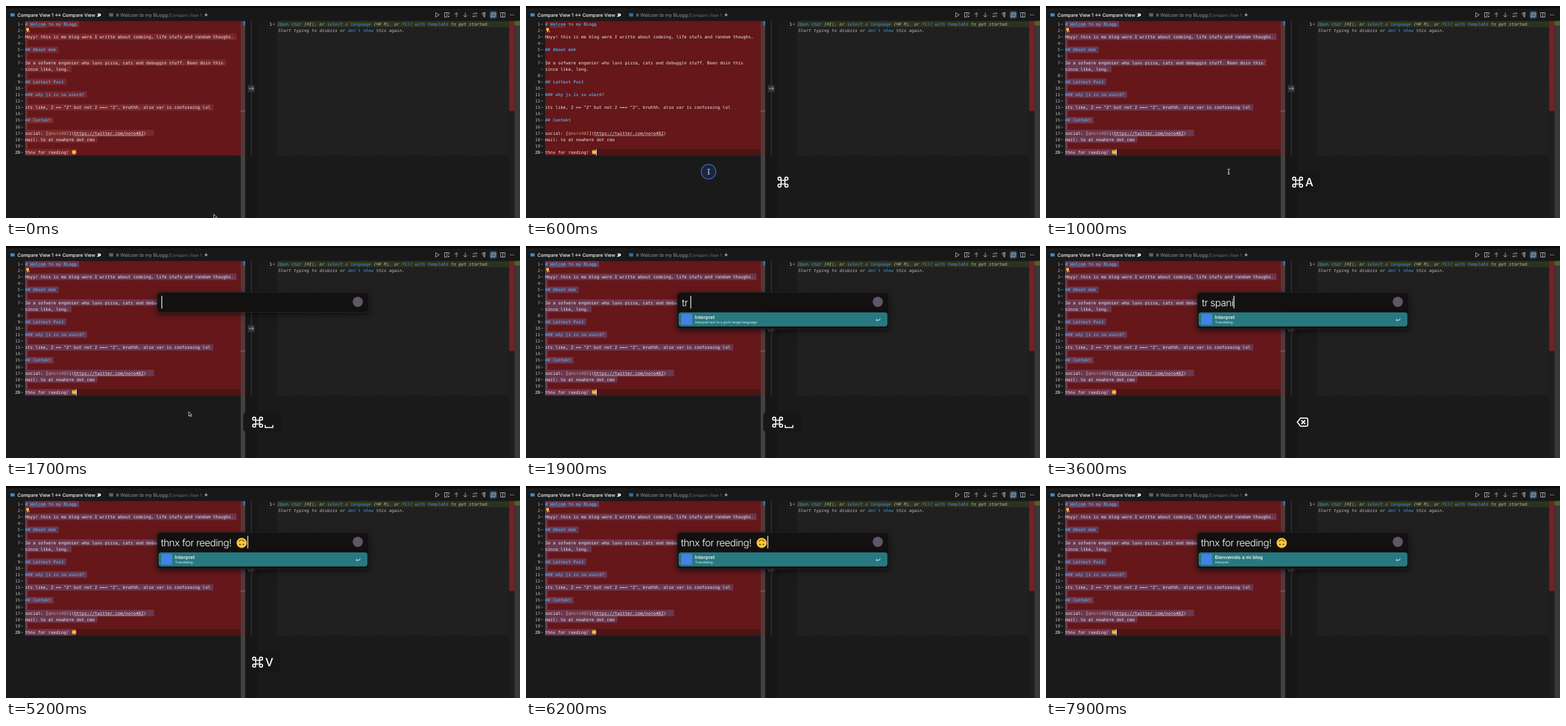
Recreate the animation shown at these times as an HTML page with a canvas. Size 808 by 334 pixels, loop 8000 ms.

```html
<!DOCTYPE html>
<html lang="en">
<head>
<meta charset="utf-8">
<title>Editor and launcher</title>
<style>
html, body { margin: 0; width: 100%; height: 100%; overflow: hidden; background: #1a1a1a; }
canvas { display: block; width: 808px; height: 334px; }
</style>
</head>
<body>
<canvas id="stage"></canvas>
<script>
const W = 808, H = 334, LOOP = 8000;
const ROW = 10.1, TOP = 23.4, CHAR = 4.052;
const MONO = '6.73px "DejaVu Sans Mono", monospace';
const UI = 'Inter, sans-serif';
const HEAD = '#569cd6', LINK = '#3794ff', TEXT = '#ececec';

const canvas = document.getElementById('stage');
const ctx = canvas.getContext('2d');
const ratio = window.devicePixelRatio || 1;
canvas.width = W * ratio;
canvas.height = H * ratio;

// One entry per visual row; a row starting with '~' continues the line above.
const rows = [
  '# Welcom to my BLogg', '',
  'Heyy! this is me blog were I writte about codeing, life stufs and random thoughs.', '',
  '## About meh', '',
  'Im a sofwere engenier who luvs pizza, catz and debuggin stuff. Been doin this',
  '~since like, long.', '',
  '## Lattest Post', '',
  '### why js is so wierd?', '',
  'its like, 2 == "2" but not 2 === "2", bruhhh. also var is confuseing lol', '',
  '## Contakt', '',
  'social: [@noro482](https://twitter.com/noro482)  ',
  'mail: to at nowhere dot cmo', '',
  'thnx for reeding! '
];

const clamp = v => Math.max(0, Math.min(1, v));
const ramp = (t, a, b) => clamp((t - a) / (b - a));
const ease = p => p * p * (3 - 2 * p);

function rect(x, y, w, h, color) {
  ctx.fillStyle = color;
  ctx.fillRect(x, y, w, h);
}

function round(x, y, w, h, r, fill, stroke) {
  ctx.beginPath();
  ctx.roundRect(x, y, w, h, r);
  if (fill) { ctx.fillStyle = fill; ctx.fill(); }
  if (stroke) { ctx.strokeStyle = stroke; ctx.lineWidth = 0.7; ctx.stroke(); }
}

function circle(x, y, r, color) {
  ctx.fillStyle = color;
  ctx.beginPath();
  ctx.arc(x, y, r, 0, Math.PI * 2);
  ctx.fill();
}

function label(text, x, y, font, color, spacing = 0, align = 'left') {
  ctx.font = font;
  ctx.letterSpacing = spacing + 'px';
  ctx.textAlign = align;
  ctx.fillStyle = color;
  ctx.fillText(text, x, y);
}

function stroke(path, color, width) {
  ctx.strokeStyle = color;
  ctx.lineWidth = width;
  ctx.stroke(new Path2D(path));
}

function at(x, y, draw) {
  ctx.save();
  ctx.transform(1, 0, 0, 1, x, y);
  draw();
  ctx.restore();
}

function fade(alpha, draw) {
  if (alpha <= 0) return;
  ctx.save();
  ctx.globalAlpha = alpha;
  draw();
  ctx.restore();
}

function upsideDownFace(x, y, r) {
  at(x, y, () => {
    ctx.scale(r, r);
    circle(0, 0, 1, '#fcc63a');
    circle(-0.33, 0.3, 0.15, '#5b3b12');
    circle(0.33, 0.3, 0.15, '#5b3b12');
    ctx.strokeStyle = '#5b3b12';
    ctx.lineWidth = 0.14;
    ctx.beginPath();
    ctx.arc(0, -0.05, 0.55, Math.PI * 1.12, Math.PI * 1.88);
    ctx.stroke();
  });
}

function tabs() {
  rect(0, 0, W, TOP, '#181818');
  rect(0, 0, W, 3.5, '#0b0b0b');
  rect(0, 4, 156, TOP - 4, '#1b1b1b');
  rect(7, 11.5, 6.5, 5, '#3f8ad0');
  label('Compare View 1 ↔ Compare View 2', 18, 16.5, '500 7.4px ' + UI, '#fff');
  circle(147, 14, 2.2, '#fff');
  rect(162, 11.5, 6.5, 5, '#376f9f');
  label('# Welcom to my BLogg', 173, 16.5, '7.4px ' + UI, '#9a9a9a');
  label('/Compare View 1', 255, 16.5, '6.6px ' + UI, '#737373');
  circle(314.5, 14, 2.2, '#8a8a8a');
}

function toolbar() {
  const icons = [
    [678, 'M-2.5-3.5L3 0L-2.5 3.5Z'],
    [693, 'M-3.5-3.5H0V3.5H-3.5ZM0-3.5H3.5V0M1.5 2.5H4M2.8 1.2V3.8'],
    [708, 'M0 3.5V-3.5M-3-.5L0-3.5L3-.5'],
    [722, 'M0-3.5V3.5M-3 .5L0 3.5L3 .5'],
    [737, 'M-3.5-2H3.5L1.5-4M3.5 2H-3.5L-1.5 4'],
    [751, 'M2.8-3.5H-.5A1.8 1.8 0 0 0-.5 .2H.2M.2-3.5V3.8M1.8-3.5V3.8'],
    [766, 'M-3.5-2.5L-1.2-3.5L1.2-2.5L3.5-3.5V2.5L1.2 3.5L-1.2 2.5L-3.5 3.5ZM-1.2-3.5V2.5M1.2-2.5V3.5'],
    [781, 'M-3.5-3.5H3.5V3.5H-3.5ZM0-3.5V3.5']
  ];
  round(760.5, 8.5, 11, 11, 2, '#253d55', '#315a80');
  for (const [x, path] of icons) at(x, 14, () => stroke(path, '#c8c8c8', 0.8));
  for (const d of [-2.5, 0, 2.5]) circle(795.5 + d, 14, 0.65, '#c8c8c8');
}

function plainRow(text, y) {
  const heading = text.startsWith('#');
  label(text, 30, y, (heading ? 'bold ' : '') + MONO, heading ? HEAD : TEXT);
}

function linkRow(text, y) {
  const from = text.indexOf('@'), to = text.indexOf(']');
  label(text.slice(0, from), 30, y, MONO, TEXT);
  label(text.slice(from, to), 30 + from * CHAR, y, MONO, '#ce9178');
  label(text.slice(to), 30 + to * CHAR, y, MONO, TEXT);
  const start = text.indexOf('http'), end = text.lastIndexOf(')');
  rect(30 + start * CHAR, y + 1.2, (end - start) * CHAR, 0.6, TEXT);
}

function leftPane(t) {
  const clicked = t >= 500;
  const selected = !clicked || t >= 800;
  const bottom = TOP + rows.length * ROW;
  rect(0, TOP, 376, H - TOP, '#1a1a1a');
  rect(30, TOP, 339, bottom - TOP, '#651719');
  if (clicked) rect(111, bottom - ROW, 258, ROW, '#4b1415');
  let number = 0;
  rows.forEach((row, i) => {
    const y = TOP + i * ROW, base = y + 7.5;
    const wrapped = row[0] === '~';
    const text = wrapped ? row.slice(1) : row;
    const last = i === rows.length - 1;
    if (!wrapped) {
      number++;
      label(number, 22.3, base, MONO, last ? '#fff' : '#b4b4b4', 0, 'right');
    }
    label('−', 23, base, MONO, '#a5a5a5');
    if (selected) {
      const width = last ? 80 : (text.length + 1) * CHAR;
      rect(30, y, width, ROW, clicked ? '#6b3850' : '#79292d');
    }
    (text.includes('@') ? linkRow : plainRow)(text, base);
  });
  let wave = 'M38 33.3';
  for (let x = 39; x <= 62; x++) wave += `L${x} ${x % 2 ? 32.5 : 33.5}`;
  stroke(wave, '#4a9de0', 0.6);
  circle(34, 37, 2.4, '#f5c03c');
  rect(33, 39, 2, 2.2, '#d9a637');
  circle(36.5, 40.5, 1, '#ff9a2e');
  upsideDownFace(107, bottom - 5.2, 3.3);
  const caret = clicked && (t < 1200 || (t - 700) % 1000 < 500);
  if (caret) rect(110, bottom - ROW, 1, ROW, '#eee');

  rect(369, TOP, 7, H - TOP, '#424242');
  rect(369, TOP, 7, bottom - TOP, 'rgba(130,30,30,.25)');
  rect(369, 165, 7, 0.8, '#878787');
  rect(373.5, 24, 2.5, 6.5, '#3e79b7');
}

function rightPane() {
  const x0 = 426, x1 = 791, y0 = TOP + ROW, y1 = TOP + rows.length * ROW;
  rect(376, TOP, W - 376, H - TOP, '#1a1a1a');
  rect(376, TOP, 20, H - TOP, '#171717');
  rect(385.4, TOP, 1, y1 - TOP, '#414141');
  round(380, 124.5, 11, 11, 1.5, '#343434');
  at(385.5, 130, () => stroke('M-3.5 0H3.5M1-2.5L3.5 0L1 2.5', '#d0d0d0', 0.8));

  rect(x0, TOP, x1 - x0, ROW, '#2c321c');
  ctx.save();
  ctx.beginPath();
  ctx.rect(x0, y0, x1 - x0, y1 - y0);
  ctx.clip();
  ctx.beginPath();
  for (let x = x0; x < x1 + y1 - y0; x += 4.5) {
    ctx.moveTo(x, y0);
    ctx.lineTo(x - (y1 - y0), y1);
  }
  ctx.strokeStyle = '#3b3b3b';
  ctx.lineWidth = 0.8;
  ctx.stroke();
  ctx.restore();

  label('1', 418, TOP + 7.5, MONO, '#f0f0f0', 0, 'right');
  label('+', 419, TOP + 7.5, MONO, '#a5a5a5');
  // Odd parts are links.
  const hints = [
    ['', 'Open chat', ' (⌘I), or ', 'select a language', ' (⌘K M), or ', 'fill with template', ' to get started.'],
    ['Start typing to dismiss or ', 'don’t show', ' this again.']
  ];
  hints.forEach((parts, i) => {
    let x = 428;
    parts.forEach((part, k) => {
      label(part, x, TOP + i * ROW + 7.5, 'italic ' + MONO, k % 2 ? LINK : '#bdbdbd');
      x += part.length * CHAR;
    });
  });

  rect(791, TOP, 17, H - TOP, '#1e1e1e');
  rect(799.5, TOP, 8.5, H - TOP, '#393939');
  rect(791, TOP, 8.5, 142, '#702326');
  rect(799.5, TOP, 8.5, 7, '#526326');
}

function pointer(t) {
  if (t >= 1850) return;
  const p = ease(ramp(t, 100, 480));
  const x = 326.7 - 39.5 * p, y = 328 - 67 * p;
  fade(ramp(t, 450, 550) * (1 - ramp(t, 680, 800)), () => {
    circle(287, 261, 12, 'rgba(30,48,100,.45)');
    ctx.strokeStyle = '#3a62b8';
    ctx.lineWidth = 1.4;
    ctx.beginPath();
    ctx.arc(287, 261, 11.5, 0, Math.PI * 2);
    ctx.stroke();
  });
  at(x, y, () => {
    if (y < 318 && t < 1550) {
      stroke('M-2-4Q0-4 0-3Q0-4 2-4M0-3V3M-2 4Q0 4 0 3Q0 4 2 4M-1 .8H1', '#e8e8e8', 0.9);
    } else {
      const arrow = 'M0 0V7L1.6 5.5L2.8 8L4 7.4L2.9 5.1H5Z';
      ctx.fillStyle = '#080808';
      ctx.fill(new Path2D(arrow));
      stroke(arrow, '#f0f0f0', 0.8);
    }
  });
}

// Query text together with the time of the last key press.
function query(t) {
  const full = 'tr spanish';
  if (t >= 4000) return { text: 'thnx for reeding!', key: 4000 };
  if (t >= 3600) return { text: full.slice(0, Math.max(0, 8 - Math.floor((t - 3600) / 33))), key: t };
  if (t >= 3400) return { text: full.slice(0, 9), key: t };
  const typed = Math.floor((t - 1900) / 57) + 3;
  return { text: full.slice(0, Math.max(0, Math.min(10, typed))), key: Math.min(t, 2300) };
}

function caretAlpha(since) {
  if (since < 620) return 1;
  const u = (since - 620) % 1000;
  return Math.max(1 - ramp(u, 0, 180), ramp(u, 360, 560));
}

function launcher(t) {
  const shown = ramp(t, 1480, 1650);
  fade(shown, () => {
    const open = t >= 1850;
    const height = open ? 58 : 31.7;
    ctx.save();
    ctx.shadowColor = 'rgba(0,0,0,.6)';
    ctx.shadowBlur = 10 * ratio;
    ctx.shadowOffsetY = 3 * ratio;
    round(237.3, 72.8, 333.5, height, 6, 'rgba(19,17,17,.98)');
    ctx.restore();
    round(237.3, 72.8, 333.5, height, 6, null, '#343232');

    const { text, key } = query(t);
    const pasted = t >= 4000;
    label(text, pasted ? 243.5 : 245, 95, '300 15.6px ' + UI, '#fff', -0.5);
    const width = ctx.measureText(text).width;
    if (pasted) upsideDownFace(370.5, 89.7, 8);
    const x = pasted ? 379.5 : text ? 245.3 + width : 244.3;
    fade(caretAlpha(t - key) * shown, () => rect(x, 78.5, 1.2, 20, '#fff'));
    circle(553, 88, 8, '#5f5668');

    if (!open) return;
    const done = t >= 7400;
    round(240.3, 105, 327.5, 21.3, 3.5, '#277980', '#348b91');
    rect(244, 107, 17, 17, '#4482ea');
    label(done ? 'Bienvenido a mi blog' : 'Interpret', 265.6, 115, '500 7.6px ' + UI, '#fff');
    const note = done ? 'Interpret' : t >= 2100 ? 'Translating...' : 'Interpret text to a givin target language';
    label(note, 265.8, 122.4, '5.3px ' + UI, '#e2f0f0');
    at(553.5, 116, () => stroke('M3-2.4V-.8Q3 .8 1.4 .8H-3M-1.2-1L-3 .8L-1.2 2.6', '#e6f4f4', 0.9));
  });
}

function commandSign(x, y) {
  at(x, y, () => {
    const s = 3, r = 2.4;
    ctx.strokeStyle = '#fff';
    ctx.lineWidth = 1.7;
    ctx.strokeRect(-s, -s, 2 * s, 2 * s);
    for (const [a, b] of [[-1, -1], [1, -1], [1, 1], [-1, 1]]) {
      ctx.beginPath();
      ctx.arc(a * (s + r), b * (s + r), r, 0, Math.PI * 2);
      ctx.stroke();
    }
  });
}

function keyHint(t) {
  const hints = [
    [540, 760, ''], [760, 1050, 'A'], [1050, 1330, 'C'], [1330, 1450, ''],
    [1450, 3000, '␣'], [3380, 3970, '⌫'], [3970, 5800, 'V']
  ];
  const hint = hints.find(([a, b]) => t >= a && t < b);
  if (!hint) return;
  const key = hint[2];
  const out = key === '␣' ? ramp(t, 2550, 3000) : ramp(t, 5350, 5800);
  fade(1 - out, () => {
    if (key === '⌫') {
      at(403.5, 277.5, () => stroke('M-8.5 0L-3.5-6.3H6Q8-6.3 8-4.3V4.3Q8 6.3 6 6.3H-3.5ZM-2-3L4 3M4-3L-2 3', '#fff', 1.8));
      return;
    }
    const wide = key === '␣';
    if (key) round(wide ? 373 : 376, 262, wide ? 62 : 55, 31, 5, '#171717');
    commandSign(key ? 395.5 : 404, 277.5);
    if (wide) at(413.5, 284, () => stroke('M-6-2V2H6V-2', '#fff', 1.6));
    else if (key) label(key, 414, 284, '500 18px ' + UI, '#fff', 0, 'center');
  });
}

function draw(t) {
  ctx.setTransform(ratio, 0, 0, ratio, 0, 0);
  ctx.textRendering = 'geometricPrecision';
  ctx.lineJoin = 'round';
  rect(0, 0, W, H, '#1a1a1a');
  leftPane(t);
  rightPane();
  tabs();
  toolbar();
  pointer(t);
  launcher(t);
  keyHint(t);
}

const begin = performance.now();
function tick() {
  draw((performance.now() - begin) % LOOP);
  requestAnimationFrame(tick);
}
tick();
</script>
</body>
</html>
```
